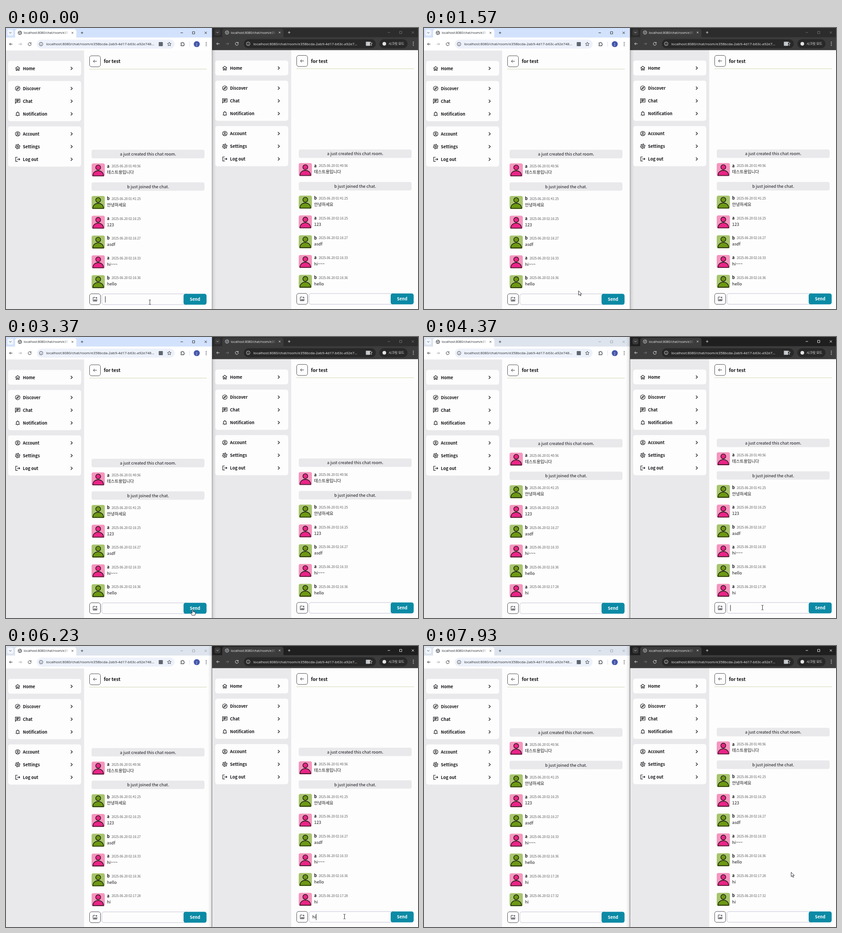
Recreate the animation shown at these times as an HTML page with a canvas. Size 905 by 619 pixels, loop 8 s.

```html
<!DOCTYPE html>
<html lang="ko">
<head>
<meta charset="utf-8">
<title>Chat</title>
<style>
html, body { margin: 0; width: 100%; height: 100%; overflow: hidden; background: #fdfdfd; }
canvas { display: block; width: 905px; height: 619px; }
</style>
</head>
<body>
<canvas id="stage"></canvas>
<script>
const W = 905, H = 619, LOOP = 8000;
const canvas = document.getElementById('stage');
const c = canvas.getContext('2d');
const dpr = window.devicePixelRatio || 1;
canvas.width = W * dpr;
canvas.height = H * dpr;

const CJK = '"Noto Sans CJK KR", "Noto Sans CJK", sans-serif';
const UI = '"Noto Sans", "Open Sans", sans-serif';
const INK = '#16161a', PAPER = '#fdfdfd';
const ROOM = 'localhost:8080/chat/room/e35';
const ROOM_TAIL = '8bcda-2ab9-4d17-b63c-a92e7';

// Moments of the story, in ms
const LEFT = { keys: [2020, 2250], clear: 3330, post: 3410, focus: 0 };
const RIGHT = { keys: [5780, 6010], clear: 7200, post: 7290, focus: 4150 };

const POINTER = [
  [0, 316, 604], [300, 316, 604], [650, 339.5, 579], [2600, 339.5, 579],
  [3080, 410, 600], [3500, 410, 600], [4050, 743.5, 596], [6350, 743.5, 596],
  [6900, 866, 599], [7330, 866, 599], [7800, 806.5, 498.5], [8000, 806.5, 498.5]
];

const MESSAGES = [
  ['a', '2025-06-20 01:40:56', '테스트용입니다'],
  ['b', '2025-06-20 01:41:25', '안녕하세요'],
  ['a', '2025-06-20 02:16:25', '123'],
  ['b', '2025-06-20 02:16:27', 'asdf'],
  ['a', '2025-06-20 02:16:33', 'hi~~~'],
  ['b', '2025-06-20 02:16:36', 'hello'],
  ['a', '2025-06-20 02:17:28', 'hi'],
  ['b', '2025-06-20 02:17:32', 'hi']
];
const SKIN = { a: ['#f696bf', '#e92487'], b: ['#a8c56e', '#6d9814'] };

const circlePath = (x, y, r) => `M${x - r} ${y}a${r} ${r} 0 1 0 ${2 * r} 0a${r} ${r} 0 1 0 ${-2 * r} 0Z`;

function gearPath() {
  let d = '';
  for (let i = 0; i < 24; i++) {
    const a = (i - 0.5) * Math.PI / 12 + Math.PI / 12;
    const r = i % 4 < 2 ? 9.3 : 6.6;
    d += (i ? 'L' : 'M') + (12 + r * Math.sin(a)).toFixed(2) + ' ' + (12 - r * Math.cos(a)).toFixed(2);
  }
  return d + 'Z' + circlePath(12, 12, 2.8);
}

// Line icons on a 24-unit grid
const ICON = {
  home: 'M3.5 11.5L12 4.5L20.5 11.5M6 10V20H10V14H14V20H18V10',
  explore: circlePath(12, 12, 9) + 'M16 8L13.8 13.8L8 16L10.2 10.2Z',
  chat: 'M3 20.5V3.5H21V17H6.5ZM6.5 7.3H17.5M6.5 10.3H17.5M6.5 13.3H14',
  bell: 'M4 18H20M6.5 18V11A5.5 5.5 0 0 1 17.5 11V18M10.5 20.7H13.5M12 3V5.5',
  user: circlePath(12, 12, 9) + circlePath(12, 9.8, 3) + 'M6 18.3C9 15.3 15 15.3 18 18.3',
  gear: gearPath(),
  logout: 'M12 4H4V20H12M9 12H20M16.5 8L20.5 12L16.5 16',
  chevron: 'M9 6L15 12L9 18',
  down: 'M7 10L12 15L17 10',
  back: 'M20 12H5M11 5.5L4.5 12L11 18.5',
  forward: 'M4 12H19M13 5.5L19.5 12L13 18.5',
  reload: 'M18.5 7.5A8 8 0 1 0 20 12M19.5 3V8.5H14',
  image: 'M13 4H4V20H20V11M7 17L10.5 13L13 15.5L15 13.5L17.5 17ZM18 2.5V9.5M14.5 6H21.5',
  cross: 'M6 6L18 18M18 6L6 18',
  plus: 'M12 4V20M4 12H20',
  globe: circlePath(12, 12, 9) + 'M4 9L9 10L11 14L9 20M14 4L13 8L17 11L20 10M14 15L18 16',
  info: circlePath(12, 12, 9) + 'M12 11V17M12 7V8.5',
  star: 'M12 3L14.7 9L21 9.7L16.3 14L17.6 20.5L12 17.2L6.4 20.5L7.7 14L3 9.7L9.3 9Z',
  puzzle: 'M4 7H9A2.5 2.5 0 0 1 14 7H18V12A2.5 2.5 0 0 1 18 17V21H4V16A2.5 2.5 0 0 0 4 11Z',
  min: 'M5 12H19',
  max: 'M5 5H19V19H5Z'
};
for (const k in ICON) ICON[k] = new Path2D(ICON[k]);

function icon(name, x, y, size = 13, color = INK, weight = 2) {
  c.save();
  c.translate(x - size / 2, y - size / 2);
  c.scale(size / 24, size / 24);
  c.strokeStyle = color;
  c.lineWidth = weight;
  c.stroke(ICON[name]);
  c.restore();
}

function text(s, x, y, font, color = INK, align = 'left') {
  c.font = font;
  c.fillStyle = color;
  c.textAlign = align;
  c.fillText(s, x, y);
}

function rect(x, y, w, h, color) {
  c.fillStyle = color;
  c.fillRect(x, y, w, h);
}

function box(x, y, w, h, r, fill, stroke, weight = 1) {
  c.beginPath();
  c.roundRect(x, y, w, h, r);
  if (fill) { c.fillStyle = fill; c.fill(); }
  if (stroke) { c.strokeStyle = stroke; c.lineWidth = weight; c.stroke(); }
}

function disc(x, y, r, color) {
  c.beginPath();
  c.arc(x, y, r, 0, 7);
  c.fillStyle = color;
  c.fill();
}

function browser(dark, active) {
  const fg = dark ? '#e3e3e3' : '#30343a';
  const bar = dark ? '#3c3c3c' : '#ffffff';
  const field = dark ? '#282828' : '#edf1fa';
  const strip = dark ? (active ? '#1f1f1f' : '#2c2c2c') : (active ? '#d3e2fc' : '#dee4ed');
  rect(-3, 0, 460, 22, strip);
  rect(-3, 21, 460, 28.5, bar);

  box(3, 3.5, 13, 13.5, 4, dark ? '#3a3a3a' : '#f0f5fe');
  icon('down', 9.5, 10.3, 11, fg);
  box(20, 2.5, 134.5, 22, 5, bar);
  icon('globe', 30.5, 10.7, 10.5, dark ? '#a4a8ad' : '#4b5056', 2.4);
  const fade = c.createLinearGradient(126, 0, 139, 0);
  fade.addColorStop(0, fg);
  fade.addColorStop(1, bar);
  text(ROOM, 39, 13.3, '6.9px ' + UI, fade);
  icon('cross', 146, 10.6, 7.5, fg, 2.8);
  icon('plus', 167, 10.6, 8, fg, 2.8);
  const control = active ? (dark ? '#ffffff' : '#1c1c1c') : (dark ? '#77797c' : '#9b9fa5');
  icon('min', 386, 10.6, 9, control, 2.4);
  icon('max', 412, 10.6, 8.5, control, 2.4);
  icon('cross', 438.7, 10.6, 9.5, control, 2.4);

  icon('back', 10.7, 35.5, 10, fg, 2.4);
  icon('forward', 31.2, 35.5, 10, dark ? '#77797c' : '#a5a8ad', 2.4);
  icon('reload', 52, 35.5, 10, fg, 2.4);
  box(67.5, 25.5, dark ? 290 : 303, 20, 10, field);
  icon('info', 77, 35.5, 10.5, fg);
  text(ROOM + ROOM_TAIL + (dark ? '...' : '48...'), 88.3, 38.4, '7.93px ' + UI, fg);
  box(335.5, 31, 9, 9, 1, dark ? '#c4c7cb' : '#5f6670');
  icon('star', dark ? 345.5 : 358.7, 35.3, 11, fg);
  if (dark) {
    rect(339, 30, 6, 0, field);
    box(365, 25.5, 62, 20, 10, field);
    disc(376, 35.5, 4, '#e3e3e3');
    text('시크릿 모드', 385.3, 38.1, '7.2px ' + CJK, '#f0f0f0');
  } else {
    icon('puzzle', 388, 35, 11, fg, 2.3);
    rect(403, 30, 1, 11, '#d5e1f8');
    disc(419, 35.5, 6.6, '#4557ab');
    text('J', 419, 38, '7px ' + UI, '#ffffff', 'center');
  }
  for (const dy of [-3.6, 0, 3.6]) disc(439.7, 35.5 + dy, 0.95, fg);
}

function menu() {
  rect(-3, 49, 174.5, 570, '#e9e9ec');
  const groups = [
    [72.5, [['home', 'Home']]],
    [116.7, [['explore', 'Discover'], ['chat', 'Chat'], ['bell', 'Notification']]],
    [216.7, [['user', 'Account'], ['gear', 'Settings'], ['logout', 'Log out']]]
  ];
  for (const [top, items] of groups) {
    box(4.5, top, 160.5, 32.6 + 28 * (items.length - 1), 5, PAPER);
    items.forEach(([name, label], i) => {
      const y = top + 16.5 + 28 * i;
      icon(name, 25.6, y, 13.3);
      text(label, 37, y + 3.5, '600 9.2px ' + CJK);
      icon('chevron', 144, y, 13.3, INK, 2.3);
    });
  }
}

function avatar(x, y, who) {
  const [back, body] = SKIN[who];
  box(x, y, 29, 29, 4, back);
  c.fillStyle = body;
  c.strokeStyle = '#14140f';
  c.lineWidth = 1.35;
  c.beginPath();
  c.arc(x + 14.5, y + 9, 5.4, 0, 7);
  c.fill();
  c.stroke();
  c.beginPath();
  c.moveTo(x + 2.7, y + 27.3);
  c.bezierCurveTo(x + 3, y + 12.2, x + 26, y + 12.2, x + 26.3, y + 27.3);
  c.closePath();
  c.fill();
  c.stroke();
}

function notice(s, y) {
  box(188, y, 248, 18.6, 4, '#e9e9ec');
  text(s, 312, y + 12.9, '9.2px ' + CJK, INK, 'center');
}

function chat(count) {
  let y = 268.3 - (count - 6) * 43.6;
  notice('a just created this chat room.', y);
  y += 30;
  MESSAGES.slice(0, count).forEach(([who, time, body], i) => {
    if (i === 1) {
      notice('b just joined the chat.', y - 1.9);
      y += 28.1;
    }
    avatar(188, y, who);
    text(who, 221.8, y + 9.2, 'bold 9.2px ' + CJK);
    text(time, 232, y + 8.9, '6.92px ' + CJK, '#55555a');
    text(body, 221.8, y + 22.9, '9.2px ' + CJK);
    y += 43.6;
  });
}

function caretOn(t, cue) {
  if (t < cue.focus || t >= cue.clear) return false;
  const start = Math.max(cue.focus, ...cue.keys.filter(k => k <= t));
  return Math.floor((t - start) / 500) % 2 === 0;
}

function page(t, cue, count) {
  rect(171.5, 49, 290, 570, PAPER);
  menu();
  box(183.5, 61.2, 24, 24.3, 4.5, PAPER, '#55555c');
  icon('back', 195.5, 73.3, 12, '#33333a', 1.9);
  text('for test', 214.7, 77.3, 'bold 10.4px ' + CJK);
  rect(183, 90, 258, 1, '#d3d4b4');
  chat(count);

  box(183.5, 585.5, 24, 24, 4.5, PAPER, '#55555c');
  icon('image', 195.5, 597.5, 12.5, '#33333a', 1.9);
  box(210.5, 585.7, 190, 23.6, 4.5, PAPER, '#c3c3d6');
  const typed = t < cue.clear ? 'hi'.slice(0, cue.keys.filter(k => k <= t).length) : '';
  text(typed, 217.8, 601.2, '9.2px ' + CJK);
  if (caretOn(t, cue)) rect(217.7 + c.measureText(typed).width, 591, 1, 13.5, '#222226');
  box(390, 585.5, 50.5, 24, 4.5, '#0b8aa5');
  text('Send', 415.2, 601.2, 'bold 9.2px ' + CJK, '#ffffff', 'center');
}

function view(t, dark, active, cue, count) {
  c.save();
  c.beginPath();
  c.rect(dark ? 452.5 : 0, 0, 452.5, H);
  c.clip();
  if (dark) c.translate(455, -0.75);
  page(t, cue, count);
  if (dark) rect(-3, 618, 460, 2, PAPER), rect(-3, 618, 174.5, 2, '#e9e9ec');
  browser(dark, active);
  c.restore();
}

function seam(rightActive) {
  const edge = 452.5, far = rightActive ? edge - 9 : edge + 9;
  const g = c.createLinearGradient(edge, 0, far, 0);
  g.addColorStop(0, 'rgba(0,0,0,.2)');
  g.addColorStop(0.4, 'rgba(0,0,0,.06)');
  g.addColorStop(1, 'rgba(0,0,0,0)');
  rect(Math.min(edge, far), 0, 9, H, g);
  rect(452, 0, 1, H, rightActive ? 'rgba(50,50,50,.55)' : 'rgba(110,110,115,.5)');
}

function pointerAt(t) {
  const i = POINTER.findIndex(p => p[0] > t);
  const [t0, x0, y0] = POINTER[i - 1], [t1, x1, y1] = POINTER[i];
  const u = (t - t0) / (t1 - t0), e = u * u * (3 - 2 * u);
  return [x0 + (x1 - x0) * e, y0 + (y1 - y0) * e];
}

const ARROW = new Path2D('M0 0V9.6L2.3 7.5L3.9 11.1L5.5 10.4L3.9 6.9H7Z');
const HAND = new Path2D('M-1 1Q0 -.7 1 1V5L5 6Q6 6.3 6 7.5L5.2 13H-1.5L-4 8.5Q-3.5 7 -1 8.5Z');
const BEAM = new Path2D('M-2.2 -5H-.5L0 -4.5L.5 -5H2.2M0 -4.5V4.5M-2.2 5H-.5L0 4.5L.5 5H2.2');

function pointer(t) {
  const [x, y] = pointerAt(t);
  const local = x > 453 ? x - 455 : x;
  const inRow = y > 585 && y < 610;
  c.save();
  c.translate(x, y);
  c.strokeStyle = '#1d1d28';
  c.fillStyle = '#ffffff';
  c.lineWidth = 0.9;
  if (inRow && local > 210 && local < 390) {
    c.stroke(BEAM);
  } else {
    const shape = inRow && local >= 390 && local < 441 ? HAND : ARROW;
    c.fill(shape);
    c.stroke(shape);
  }
  c.restore();
}

function draw(now) {
  const t = now % LOOP;
  const count = 6 + (t >= LEFT.post) + (t >= RIGHT.post);
  const rightActive = t >= RIGHT.focus;
  c.setTransform(dpr, 0, 0, dpr, 0, 0);
  rect(0, 0, W, H, PAPER);
  view(t, false, !rightActive, LEFT, count);
  view(t, true, rightActive, RIGHT, count);
  seam(rightActive);
  pointer(t);
  requestAnimationFrame(draw);
}
requestAnimationFrame(draw);
</script>
</body>
</html>
```
